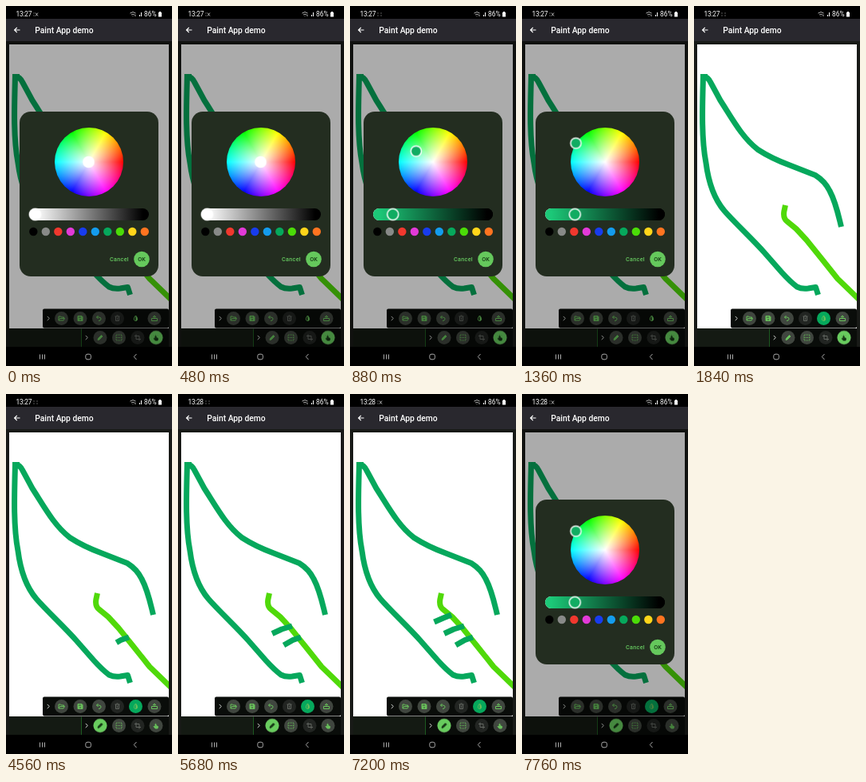
Write an HTML page that moves like this. It is 208 px wide and 450 px high and loops after 8 s.

```html
<!DOCTYPE html>
<html lang="en">
<head>
<meta charset="utf-8">
<title>Paint App demo</title>
<style>
  html, body { margin: 0; width: 100%; height: 100%; overflow: hidden; background: #000; }
  svg { display: block; width: 100vw; height: 100vh; font-family: Roboto, sans-serif; }

  .stroke { fill: none; stroke-width: 7; stroke-linejoin: round; }
  .leaf { stroke: #06a85c; }
  .stem { stroke: #50d90a; }

  .btn { fill: #40463f; }
  .off .btn { fill: #222522; }
  .icon { fill: none; stroke: #68c05b; stroke-width: 1; stroke-linejoin: round; }
  .solid { fill: #68c05b; }
  .off .icon { stroke: #626761; }
  .on .btn { fill: #68cc5e; }
  .on .icon { stroke: #143414; fill: #143414; }

  .wheel {
    width: 86px; height: 86px; border-radius: 50%;
    background:
      radial-gradient(closest-side, #fff, #fff0),
      conic-gradient(from 90deg, #f00, #f0f, #00f, #0ff, #0f0, #ff0, #f00);
  }
  .thumb { stroke: #fff; stroke-width: 1.5; }

  .a { animation: 8s linear infinite; }
  .step { animation-timing-function: step-end; }
  .dialog { animation-name: dialog; }
  .pick { animation-name: pick; }
  .slide { animation-name: slide; }
  .tint { animation-name: tint; }
  .green { animation-name: green; }
  .chosen { animation-name: chosen; }
  .pan { animation-name: pan; }
  .pen { animation-name: pen; }
  .early { animation-name: early; }
  .late { animation-name: late; }
  .draw { stroke-dasharray: 1 2; }
  .draw1 { animation-name: draw1; }
  .draw2 { animation-name: draw2; }
  .draw3 { animation-name: draw3; }
  .blink { animation: blink 970ms step-end infinite; }
  .blink.alt { animation-name: blinkAlt; }

  @keyframes dialog { 0%, 21.25% { opacity: 1 } 22.75%, 90.5% { opacity: 0 } 92.5%, 100% { opacity: 1 } }
  @keyframes pick { 0%, 9% { transform: translate(103.5px, 195px) } 12.5%, 100% { transform: translate(67.5px, 171.5px) } }
  @keyframes slide { 0%, 9% { transform: translate(36.5px, 260.5px) } 12.5%, 100% { transform: translate(66.3px, 260.5px) } }
  @keyframes tint { 0% { fill: #fff } 9%, 100% { fill: #11ac62 } }
  @keyframes green { 0% { opacity: 0 } 9%, 100% { opacity: 1 } }
  @keyframes chosen { 0% { fill: #0a0d0a } 21.25%, 100% { fill: #06a85c } }
  @keyframes pan { 0%, 46% { opacity: 1 } 49%, 100% { opacity: 0 } }
  @keyframes pen { 0%, 46% { opacity: 0 } 49%, 100% { opacity: 1 } }
  @keyframes early { 0% { opacity: 1 } 60%, 100% { opacity: 0 } }
  @keyframes late { 0% { opacity: 0 } 60%, 100% { opacity: 1 } }
  @keyframes draw1 { 0%, 54.5% { stroke-dashoffset: 1 } 58%, 100% { stroke-dashoffset: 0 } }
  @keyframes draw2 { 0%, 62.5% { stroke-dashoffset: 1 } 68%, 100% { stroke-dashoffset: 0 } }
  @keyframes draw3 { 0%, 72.5% { stroke-dashoffset: 1 } 75%, 100% { stroke-dashoffset: 0 } }
  @keyframes blink { 0% { opacity: 1 } 50%, 100% { opacity: 0 } }
  @keyframes blinkAlt { 0% { opacity: 0 } 50%, 100% { opacity: 1 } }
</style>
</head>
<body>
<svg viewBox="0 0 208 450">
  <defs>
    <circle id="disc" r="8.5"/>
    <path id="chevron" d="M-1.3-2.6 1.3 0-1.3 2.6" fill="none" stroke="#d0d4cf"/>
    <path id="pencil" d="M-3 3-2.5 1 1.5-3 3-1.5-1 2.5Z"/>
    <path id="touch" d="M-1 3.5-3 1-1 1.3V-2H0V0L2.5 1 2 3.5ZM-3-2.5v.2M-.5-4v.2M2-2.500v.2"/>
    <linearGradient id="gray"><stop offset=".05" stop-color="#fff"/><stop offset=".95"/></linearGradient>
    <linearGradient id="shade"><stop offset=".05" stop-color="#1cc878"/><stop offset=".95"/></linearGradient>
    <clipPath id="paper"><path d="M4 48H204V403H4Z"/></clipPath>
  </defs>

  <!-- system and app bars -->
  <path d="M0 0H208V450H0Z"/>
  <path d="M0 16H208V44H0Z" fill="#29282e"/>
  <path d="M0 44H208V426H0Z" fill="#181a17"/>
  <g fill="#fff" font-size="8.4">
    <text x="12.5" y="13.2" letter-spacing="-.25">13:2<tspan class="a step early">7</tspan></text>
    <text class="a step late" x="27.2" y="13.2">8</text>
    <text x="173" y="13.2">86%</text>
    <path d="M191 8h1V7h2v1h1v5.5h-4Z"/>
    <path d="M167 13v-2h1v2ZM169 13v-5h1v5Z"/>
  </g>
  <g fill="none" stroke="#ddd" stroke-width=".8">
    <path d="M155.5 9Q159 6 162.5 9M157 11Q159 9.3 161 11M159 12.5v.7M162 10.5v2.5"/>
    <path d="M35 8.5v1M35 11.5v1"/>
    <path class="blink" d="M37 8.5l3 4M40 8.5l-3 4"/>
    <path class="blink alt" d="M39 8.5v1M39 11.5v1"/>
  </g>
  <path d="M17.5 30H10.8M13.8 26.8 10.6 30 13.8 33.2" fill="none" stroke="#fff" stroke-width="1.2"/>
  <text x="36.2" y="33.6" font-size="10.3" font-weight="500" fill="#fff">Paint App demo</text>
  <g fill="none" stroke="#aaa" stroke-width="1">
    <path d="M42.5 435.5v6M45.5 435.5v6M48.5 435.5v6M163.5 435 160.3 438.5 163.5 442"/>
    <rect x="99.8" y="435.2" width="6.6" height="6.6" rx="2.2"/>
  </g>

  <!-- drawing -->
  <g clip-path="url(#paper)">
    <path d="M4 48H204V403H4Z" fill="#fff"/>
    <path class="stroke leaf" stroke-linejoin="miter" d="M184.500 276C181 262 178 246 170 231Q164 219 152 211.500L120 199Q97 190.500 80 179.500C60 164 48 141 33 118Q26 105 20.500 95 17 88 11.500 88.500C10.500 125 9 165 15 196Q20 235 38 256C52 272 72 290 88 308L110 333Q121 345 129 351 135 354 143 353L152.500 351.500 155.500 361"/>
    <path d="M8 85H17V92H8Z" fill="#06a85c"/>
    <path class="stroke stem" d="M114.500 249 112.800 257Q111.500 266 117 269.500L128 278.500 141 292.500 160 316 180 341 208 368"/>
    <path class="a stroke leaf draw draw1" pathLength="1" d="M154 304 144 307.500 132.500 314"/>
    <path class="a stroke leaf draw draw2" pathLength="1" d="M143 290 130 294 118 299.500"/>
    <path class="a stroke leaf draw draw3" pathLength="1" d="M127 276 117 280 105.500 285"/>
  </g>

  <!-- toolbars -->
  <path d="M4 403.500H94V426H4Z" fill="#141a13"/>
  <path d="M94.500 403.500V426" stroke="#1d5a20"/>
  <rect x="46" y="378.500" width="158" height="24" rx="2" fill="#0a0d0a"/>
  <path d="M95 403.500H204V426H95Z" fill="#0a0d0a"/>
  <use href="#chevron" x="53" y="390.500"/>
  <use href="#chevron" x="101" y="414.500"/>

  <g transform="translate(69.500 390.500)">
    <use href="#disc" class="btn"/>
    <path class="icon" d="M-3.500 2.500V-2.500H-1L0-1.500H3V0M-3.500 2.500-2 0H4L2.500 2.500Z"/>
  </g>
  <g transform="translate(93 390.500)">
    <use href="#disc" class="btn"/>
    <path class="icon solid" d="M-3-3H2L3-2V3H-3Z"/>
    <path d="M-2-1.500H1M-1 1.500H1" stroke="#40463f" stroke-width="1.200"/>
  </g>
  <g transform="translate(116.500 390.500)">
    <use href="#disc" class="btn"/>
    <path class="icon" d="M-1-3.500-3-1.500-1 .5M-3-1.500H0Q3-1 2.500 1T-.5 3"/>
  </g>
  <g class="off" transform="translate(139.500 390.500)">
    <use href="#disc" class="btn"/>
    <path class="icon" d="M-3-2.500H3M-1-3.500H1M-2-2.500V3H2V-2.500M0-1V2"/>
  </g>
  <g transform="translate(162.500 390.500)">
    <use href="#disc" class="a step chosen"/>
    <path d="M0-3.500C3.200 0 2.500 3 0 3S-3.200 0 0-3.500Z" class="icon"/>
    <path d="M0-3.500V3C2.500 3 3.200 0 0-3.500Z" class="solid"/>
  </g>
  <g transform="translate(186 390.500)">
    <use href="#disc" class="btn"/>
    <path class="icon" d="M-3.500 0V3H3.500V0ZM0 0V-3M-2-1.500 0-3.500 2-1.500"/>
  </g>

  <g transform="translate(118 414.500)">
    <use href="#disc" class="btn"/><use href="#pencil" class="icon solid"/>
    <g class="a on pen"><use href="#disc" class="btn"/><use href="#pencil" class="icon"/></g>
  </g>
  <g transform="translate(141.500 414.500)">
    <use href="#disc" class="btn"/>
    <path class="icon" stroke-dasharray="1 1" d="M-3.500-3.500H3.500V3.500H-3.500ZM-3.500 0H3.500"/>
  </g>
  <g class="off" transform="translate(165 414.500)">
    <use href="#disc" class="btn"/>
    <path class="icon" d="M-2-4V2H4M-4-2H2V4"/>
  </g>
  <g transform="translate(188 414.500)">
    <use href="#disc" class="btn"/><use href="#touch" class="icon solid"/>
    <g class="a on pan"><use href="#disc" class="btn"/><use href="#touch" class="icon"/></g>
  </g>

  <!-- colour dialog -->
  <g class="a dialog">
    <path d="M0 44H208V426H0Z" fill-opacity=".33"/>
    <rect x="17" y="132" width="174" height="206" rx="14" fill="#232d20"/>
    <foreignObject x="60.500" y="152" width="86" height="86"><div class="wheel"></div></foreignObject>
    <g class="a pick"><circle class="a step tint thumb" r="6.600"/></g>

    <rect x="29" y="253" width="150" height="15" rx="7.500" fill="url(#gray)"/>
    <rect class="a step green" x="29" y="253" width="150" height="15" rx="7.500" fill="url(#shade)"/>
    <g class="a slide"><circle class="a step tint thumb" r="7"/></g>

    <g id="swatches"></g>

    <text x="142" y="319.300" text-anchor="middle" font-size="7.200" font-weight="500" letter-spacing=".3" fill="#66c95f">Cancel</text>
    <circle cx="170" cy="316.500" r="9.800" fill="#65c85c"/>
    <text x="170" y="319.200" text-anchor="middle" font-size="7.200" font-weight="500" fill="#173d16">OK</text>
  </g>
</svg>
<script>
  const palette = ['#000', '#888a88', '#f0382e', '#e23ad8', '#183cee', '#149cee', '#06a85c', '#4bdc08', '#ffd51a', '#ff7420'];
  document.getElementById('swatches').innerHTML = palette
    .map((color, i) => `<circle cx="${34.3 + i * 15.5}" cy="282" r="5.2" fill="${color}"/>`)
    .join('');
</script>
</body>
</html>
```
